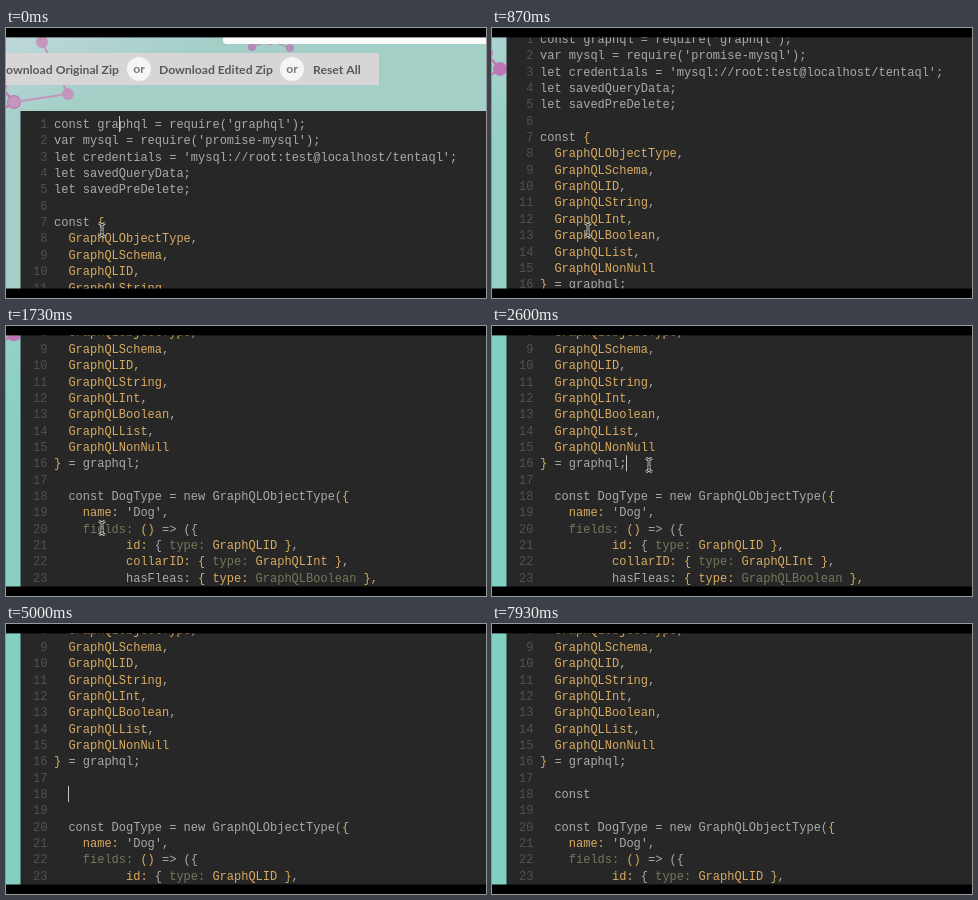
Recreate the animation shown at these times as an HTML page with a canvas. Size 480 by 270 pixels, loop 8000 ms.

```html
<!DOCTYPE html>
<html lang="en">
<head>
<meta charset="utf-8">
<title>Code editor</title>
<style>
  html, body { margin: 0; width: 100%; height: 100%; overflow: hidden; background: #000; }
  canvas { display: block; }
</style>
</head>
<body>
<canvas id="stage" width="480" height="270"></canvas>
<script>
const ctx = document.getElementById('stage').getContext('2d');
const LOOP = 8000, CHAR = 7.2, PITCH = 16.35, TEXT_X = 48, FIRST_BASE = 100;

// Each run starts with its colour mark.
const COLORS = { '|': '#a9aba8', '~': '#d8ab60', '^': '#73785a' };
const CODE = `|const graphql = require('graphql');
|var mysql = require('promise-mysql');
|let credentials = 'mysql://root:test@localhost/tentaql';
|let savedQueryData;
|let savedPreDelete;

|const ~{
~  GraphQLObjectType|,
~  GraphQLSchema|,
~  GraphQLID|,
~  GraphQLString|,
~  GraphQLInt|,
~  GraphQLBoolean|,
~  GraphQLList|,
~  GraphQLNonNull
~}| = graphql;

|  const DogType = new GraphQLObjectType(~{
~    name:| 'Dog',
^    fields:~ ()| => ({
~          id:| { ^type:~ GraphQLID }|,
~          collarID: { ^type:~ GraphQLInt }|,
|          hasFleas:~ { type: ^GraphQLBoolean ~},`.split('\n');

const TYPED = [[6000, 'co'], [6130, 'con'], [6930, 'cons'], [7000, 'const'], [7200, 'const ']];
const SCROLL = [[70, 0], [870, 85], [1130, 207], [1300, 207], [1700, 204]];
const MOUSE_X = [[1770, 96], [2330, 157]];
const MOUSE_Y = [[1770, 202], [2330, 139]];
const CARET_OFF = [[530, 1060], [1590, 2470], [3000, 3530], [4470, 4930], [7730, 8000]];

function ease(keys, t) {
  if (t <= keys[0][0]) return keys[0][1];
  for (let i = 1; i < keys.length; i++) {
    const [t0, a] = keys[i - 1], [t1, b] = keys[i];
    if (t < t1) {
      const p = (t - t0) / (t1 - t0);
      return a + (b - a) * p * p * (3 - 2 * p);
    }
  }
  return keys[keys.length - 1][1];
}

function rect(color, x, y, w, h) {
  ctx.fillStyle = color;
  ctx.fillRect(x, y, w, h);
}

function dot(color, x, y, r) {
  ctx.fillStyle = color;
  ctx.beginPath();
  ctx.arc(x, y, r, 0, 7);
  ctx.fill();
}

function text(str, x, y, color, align = 'left') {
  ctx.fillStyle = color;
  ctx.textAlign = align;
  ctx.fillText(str, x, y);
}

function path(points, color, width) {
  ctx.strokeStyle = color;
  ctx.lineWidth = width;
  ctx.beginPath();
  points.forEach(([x, y]) => ctx.lineTo(x, y));
  ctx.stroke();
}

function network(points, color, r) {
  path(points, color, r / 3);
  points.forEach(([x, y]) => dot(color, x, y, r));
}

function background(t, scroll) {
  rect('#82d0c0', 0, 0, 480, 270);
  const fade = Math.max(0, 1 - t / 2200);
  rect(`rgba(195,205,205,${0.5 * fade})`, 0, 0, 480, 270);
  const haze = ctx.createLinearGradient(0, 0, 40, 90);
  haze.addColorStop(0, `rgba(215,222,232,${0.6 * fade})`);
  haze.addColorStop(1, 'rgba(215,222,232,0)');
  rect(haze, 0, 0, 480, 270);

  const drift = -38 * t / 1000;
  network([[-6, 58 + drift], [8, 74 + drift], [-20, 92 + drift]], '#be76b4', 7);
  if (scroll > 84) return;
  network([[8, 74 + drift], [62, 66 + drift], [36, 14 + drift]], '#c596bd', 6);
  network([[246, 19 + drift], [264, 13 + drift], [284, 20 + drift]], '#b58bb8', 4);
}

function toolbar(scroll) {
  ctx.save();
  ctx.translate(0, -scroll);
  ctx.fillStyle = '#fbfbfb';
  ctx.beginPath();
  ctx.roundRect(217, -20, 280, 36, 4);
  ctx.fill();
  rect('#d8d5d7', 0, 25, 373, 32);
  ctx.font = 'bold 12.2px Lato, sans-serif';
  const ink = '#58585b';
  text('Download Original Zip', 113, 45.5, ink, 'right');
  text('Download Edited Zip', 153, 45.5, ink);
  text('Reset All', 307, 45.5, ink);
  for (const x of [133, 286]) {
    dot('#f6f5f6', x, 41, 12);
    text('or', x, 45, '#77777a', 'center');
  }
  ctx.restore();
}

function codeLine(line, y) {
  let x = TEXT_X;
  for (const run of line.split(/(?=[|~^])/)) {
    const str = run.slice(1);
    text(str, x, y, COLORS[run[0]]);
    x += str.length * CHAR;
  }
}

function editor(t, scroll) {
  rect('#272728', 14.5, 83 - scroll, 466, 400);
  ctx.font = '12px "Liberation Mono", "Courier New", monospace';
  const typed = TYPED.reduce((s, [at, str]) => t >= at ? str : s, '');
  const added = t < 3670 ? [] : t < 3800 ? ['|'] : ['|', '|  ' + typed];
  const lines = [...CODE.slice(0, 16), ...added, ...CODE.slice(16)];
  const base = row => FIRST_BASE + row * PITCH - scroll;
  lines.forEach((line, row) => {
    if (base(row) < 0 || base(row) > 275) return;
    text(row + 1, 41.5, base(row), '#505152', 'right');
    if (line) codeLine(line, base(row));
  });

  if (CARET_OFF.some(([a, b]) => t >= a && t < b)) return;
  const [row, col] = t < 2470 ? [0, 9] : t < 3670 ? [15, 12]
    : t < 3800 ? [16, 0] : [17, 2 + typed.length];
  rect('#c6c6c4', Math.round(TEXT_X + col * CHAR), base(row) - 12, 1, 16);
}

function ibeam(x, y) {
  for (const [color, width] of [['#c4c4c2', 2.8], ['#222', 1]]) {
    path([[x - 3, y - 7], [x, y - 5], [x + 3, y - 7]], color, width);
    path([[x - 3, y + 7], [x, y + 5], [x + 3, y + 7]], color, width);
    path([[x, y - 5], [x, y + 5]], color, width);
    path([[x - 2, y + 2], [x + 2, y + 2]], color, width);
  }
}

function draw(now) {
  const t = now % LOOP, scroll = ease(SCROLL, t);
  background(t, scroll);
  toolbar(scroll);
  editor(t, scroll);
  if (t < 3670) ibeam(ease(MOUSE_X, t), ease(MOUSE_Y, t));
  rect('#000', 0, 0, 480, 9.4);
  rect('#000', 0, 260.5, 480, 10);
}

const start = performance.now();
function frame() {
  draw(performance.now() - start);
  requestAnimationFrame(frame);
}
frame();
</script>
</body>
</html>
```
